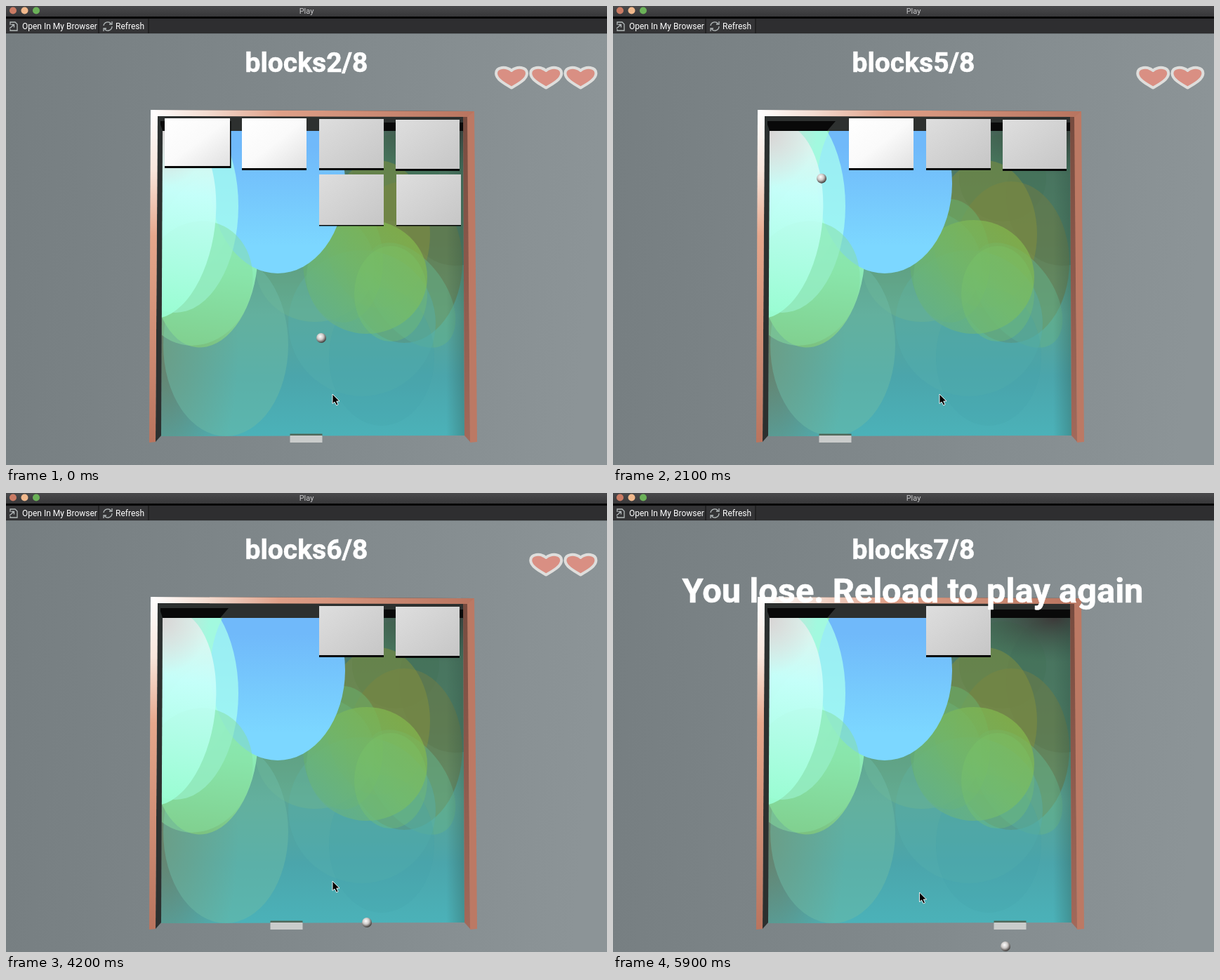
An HTML page that plays this animation: 856 by 654 pixels, repeating every 6000 ms.

```html
<!DOCTYPE html>
<html lang="en">
<head>
<meta charset="utf-8">
<title>Play</title>
<style>
html, body { margin: 0; width: 100%; height: 100%; overflow: hidden; background: #7e8689; }
svg { display: block; width: 856px; height: 654px; }
text { font-family: Roboto, sans-serif; fill: #fff; }
.big { font-weight: 700; text-anchor: middle; stroke: #fff; stroke-width: .6; }
.bar { font-size: 12px; }
</style>
</head>
<body>
<svg viewBox="0 0 856 654" xmlns="http://www.w3.org/2000/svg">
  <defs>
    <linearGradient id="room" x2="1" y2=".06"><stop stop-color="#767e81"/><stop offset=".5" stop-color="#80888b"/><stop offset="1" stop-color="#8c9497"/></linearGradient>
    <linearGradient id="title" x2="0" y2="1"><stop stop-color="#4a4a4c"/><stop offset="1" stop-color="#373739"/></linearGradient>
    <linearGradient id="floor" x2="0" y2="1"><stop stop-color="#4a7060"/><stop offset=".35" stop-color="#53876c"/><stop offset=".6" stop-color="#5aa597"/><stop offset=".8" stop-color="#4ba5ab"/><stop offset="1" stop-color="#4bb2b9"/></linearGradient>
    <linearGradient id="edge"><stop offset=".94" stop-color="#2a4a40" stop-opacity="0"/><stop offset="1" stop-color="#2a4a40" stop-opacity=".3"/></linearGradient>
    <linearGradient id="blue" x2="0" y2="1"><stop offset=".3" stop-color="#70b9fa"/><stop offset=".85" stop-color="#7cd7ff"/></linearGradient>
    <linearGradient id="mint" x2="0" y2="1"><stop offset=".2" stop-color="#98ffd8"/><stop offset=".55" stop-color="#90f0b8"/><stop offset="1" stop-color="#7dc37e"/></linearGradient>
    <linearGradient id="pale" x2="0" y2="1"><stop offset=".1" stop-color="#e2f6f2"/><stop offset=".35" stop-color="#c8fffb"/><stop offset="1" stop-color="#98ffd3"/></linearGradient>
    <linearGradient id="leaf" x1="1" x2="0" y2="1"><stop offset=".1" stop-color="#84b548"/><stop offset=".5" stop-color="#74b866"/><stop offset=".9" stop-color="#62b08c"/></linearGradient>
    <linearGradient id="wallL" x2="0" y2="1"><stop stop-color="#fff"/><stop offset=".18" stop-color="#f8e6dc"/><stop offset=".38" stop-color="#e6a78c"/><stop offset="1" stop-color="#b9745e"/></linearGradient>
    <linearGradient id="wallT"><stop stop-color="#fff"/><stop offset=".17" stop-color="#f4ddd2"/><stop offset=".4" stop-color="#dfa088"/><stop offset="1" stop-color="#b8745f"/></linearGradient>
    <linearGradient id="wallR" x2="0" y2="1"><stop stop-color="#764b3f"/><stop offset="1" stop-color="#a2695a"/></linearGradient>
    <linearGradient id="lit" x2="1" y2="1"><stop stop-color="#fff"/><stop offset=".5" stop-color="#fafafa"/><stop offset="1" stop-color="#e0e0e0"/></linearGradient>
    <linearGradient id="dim" x2="1" y2="1"><stop stop-color="#dedede"/><stop offset="1" stop-color="#c6c6c6"/></linearGradient>
    <radialGradient id="corner" cx="0" cy="0" r="1"><stop stop-color="#d8d4d4"/><stop offset="1" stop-color="#d8d4d4" stop-opacity="0"/></radialGradient>
    <radialGradient id="dusk" cx=".85" cy="0" r=".9"><stop stop-color="#3c3838"/><stop offset="1" stop-color="#3c5a4a" stop-opacity="0"/></radialGradient>
    <radialGradient id="brown" cx="0" cy=".5" r="1"><stop stop-color="#70785a" stop-opacity=".8"/><stop offset="1" stop-color="#70785a" stop-opacity="0"/></radialGradient>
    <radialGradient id="sphere" cx=".4" cy=".35" r=".65"><stop stop-color="#fff"/><stop offset=".5" stop-color="#ccc8c6"/><stop offset="1" stop-color="#403c3a"/></radialGradient>
    <clipPath id="field"><path d="M223 178H651L653 612L221 613Z"/></clipPath>
    <path id="heart" d="M0 29C-9 24-22 17-22 8.500C-22-1-8-2 0 4.500C8-2 22-1 22 8.500C22 17 9 24 0 29Z" fill="#d98f83" stroke="#dededc" stroke-width="4" stroke-linejoin="round"/>
  </defs>

  <rect y="39" width="856" height="615" fill="url(#room)"/>

  <rect width="856" height="15" fill="url(#title)"/>
  <rect y="15" width="856" height="24" fill="#070707"/>
  <rect y="18" width="856" height="21" fill="#2e2e30"/>
  <path d="M0 19H131V38H0ZM133 19H202V38H133Z" fill="#343436"/>
  <path d="M132 18V39M203 18V39" stroke="#161617"/>
  <path d="M0 39.500H856" stroke="#6f7679"/>
  <circle cx="10" cy="6.500" r="5" fill="#ca7b64"/>
  <circle cx="26.500" cy="6.500" r="5" fill="#f0b88c"/>
  <circle cx="43" cy="6.500" r="5" fill="#6bb158"/>
  <text x="428" y="11" font-size="11" text-anchor="middle" style="fill:#c6c6c8">Play</text>
  <g fill="none" stroke="#b4babb" stroke-width="1.300">
    <path d="M6 27V23H13L16 26V35H6V33M5 32L11 27M7.500 26.500H11.500V30.500"/>
    <path d="M139 28A6 6 0 0 1 149.500 25M151 29A6 6 0 0 1 140.500 33M151 22V26H147M139 36V32H143"/>
  </g>
  <text class="bar" x="23" y="33">Open In My Browser</text>
  <text class="bar" x="156" y="33">Refresh</text>

  <path d="M206 148L667 150L661 180H214Z" fill="#2d302f"/>
  <path d="M220 164H317L305 178H220ZM538 166H652V179H538Z" fill="#090909"/>
  <g clip-path="url(#field)">
    <rect x="220" y="178" width="434" height="436" fill="url(#floor)"/>
    <ellipse cx="555" cy="245" rx="62" ry="62" fill="#427457" opacity=".5"/>
    <ellipse cx="640" cy="270" rx="80" ry="100" fill="#44705a" opacity=".5"/>
    <rect x="500" y="178" width="154" height="70" fill="url(#dusk)"/>
    <ellipse cx="567" cy="365" rx="83" ry="115" fill="#6c7c48" opacity=".6"/>
    <ellipse cx="530" cy="325" rx="74" ry="105" fill="#84903c" opacity=".5"/>
    <ellipse cx="576" cy="412" rx="50" ry="85" transform="rotate(-36 576 412)" fill="#65b38a" opacity=".5"/>
    <ellipse cx="507" cy="452" rx="105" ry="104" fill="#55aeab" opacity=".42"/>
    <ellipse cx="535" cy="500" rx="75" ry="98" fill="#3f9eaa" opacity=".22"/>
    <ellipse cx="440" cy="370" rx="85" ry="80" fill="#6fb58d" opacity=".42"/>
    <ellipse cx="480" cy="363" rx="57" ry="88" fill="#68b46c" opacity=".5"/>
    <ellipse cx="514" cy="386" rx="86" ry="81" fill="url(#leaf)" opacity=".75"/>
    <ellipse cx="548" cy="410" rx="52" ry="68" fill="#7ac668" opacity=".3"/>
    <rect x="221" y="370" width="110" height="244" fill="url(#brown)"/>
    <ellipse cx="313" cy="483" rx="89" ry="130" fill="#6dbba6" opacity=".5"/>
    <ellipse cx="250" cy="260" rx="78" ry="125" fill="#8fe8ab"/>
    <ellipse cx="284" cy="365" rx="74" ry="122" transform="rotate(6 284 365)" fill="url(#mint)" opacity=".93"/>
    <ellipse cx="387" cy="252" rx="96" ry="129" fill="url(#blue)"/>
    <ellipse cx="241" cy="285" rx="90" ry="152" fill="#a9fff1" opacity=".75"/>
    <ellipse cx="272" cy="395" rx="78" ry="90" transform="rotate(20 272 395)" fill="#86e0a0" opacity=".5"/>
    <ellipse cx="223" cy="306" rx="75" ry="140" transform="rotate(7 223 306)" fill="url(#pale)" opacity=".9"/>
    <rect x="221" y="178" width="70" height="80" fill="url(#corner)"/>
    <rect x="221" y="178" width="432" height="436" fill="url(#edge)"/>
  </g>
  <path d="M216 156L223 178L221 612L213 621Z" fill="#2c302f"/>
  <path d="M651 158H658L661 621L653 612Z" fill="url(#wallR)"/>
  <path d="M206 148L667 150V158L206 157Z" fill="url(#wallT)"/>
  <path d="M206 148L216 156L213 621L204 622Z" fill="url(#wallL)"/>
  <path d="M657 158L667 150L671 621L661 622Z" fill="#bc7964"/>

  <g id="blocks"></g>
  <g id="paddle">
    <path d="M0 609.500H46V613H0Z" fill="#52685a"/>
    <path d="M0 612H46V622H0Z" fill="#cacccb"/>
  </g>
  <circle id="ball" r="7" fill="url(#sphere)"/>
  <g id="hearts"></g>
  <text id="score" class="big" x="428" y="93.500" font-size="39"></text>
  <text id="lose" class="big" x="427" y="156" font-size="48.800">You lose. Reload to play again</text>
  <path id="cursor" d="M0 0V13.500L3 11L5.700 16L8 15L5.800 10H10Z" fill="#000" stroke="#fff" stroke-width=".9"/>
</svg>
<script>
const LOOP = 6000, STEP = 100;
const $ = id => document.getElementById(id);

function add(parent, tag, attrs) {
  const el = document.createElementNS('http://www.w3.org/2000/svg', tag);
  for (const key in attrs) el.setAttribute(key, attrs[key]);
  return parent.appendChild(el);
}

// x, y, width, height, fill, time of the hit
const blocks = [
  [226, 160, 93, 68, 'lit', 2100],
  [336, 160, 92, 71, 'lit', 2600],
  [446, 161, 92, 70, 'dim', LOOP],
  [555, 162, 91, 70, 'dim', 5400],
  [446, 240, 92, 72, 'dim', 1800],
  [556, 240, 92, 72, 'dim', 1900]
].map(([x, y, w, h, fill, end]) => {
  const el = add($('blocks'), 'g', {});
  add(el, 'rect', { x, y: y + 4, width: w + (x < 300 ? 1.5 : 0), height: h - (y > 200 ? 2.5 : 1), fill: '#070807' });
  add(el, 'rect', { x, y, width: w, height: h, fill: `url(#${fill})` });
  return { el, end };
});

const hearts = [200, 4300, 5900].map((end, i) => ({
  el: add($('hearts'), 'use', { href: '#heart', x: 720 + i * 49.2, y: 87.5 }), end
}));

const flights = [
  [[0, 449, 473], [250, 476, 675]],
  [[1380, 427, 600], [1600, 436, 420], [1740, 442, 319], [1870, 548, 285],
   [2080, 312, 238], [2190, 230, 280], [2500, 413, 262], [2540, 405, 241],
   [2780, 230, 270], [3300, 590, 335], [3370, 645, 352], [3800, 230, 480],
   [4200, 514, 612], [4320, 546, 655]],
  [[4950, 427, 600], [5400, 600, 241], [5600, 645, 403], [5900, 559, 646], [6000, 530, 727]]
];
const paddle = [[0, 404.5], [900, 404.5], [1300, 293.5], [3900, 293.5], [4200, 376.5],
  [4299, 404.5], [5300, 404.5], [5900, 542.5], [LOOP, 542.5]];

// Linear interpolation through [time, ...values]; null outside the range.
function along(keys, t) {
  const i = keys.findIndex((k, n) => n && t <= k[0] && t >= keys[n - 1][0]);
  if (i < 1) return null;
  const a = keys[i - 1], b = keys[i], f = (t - a[0]) / (b[0] - a[0]);
  return a.slice(1).map((v, n) => v + (b[n + 1] - v) * f);
}

const show = (el, on) => el.setAttribute('visibility', on ? 'visible' : 'hidden');
const move = (el, x, y) => el.setAttribute('transform', `translate(${x} ${y})`);

function draw(t) {
  for (const { el, end } of [...blocks, ...hearts]) show(el, t < end);
  $('score').textContent = `blocks${2 + blocks.filter(b => t >= b.end).length}/8`;
  const pos = flights.map(f => along(f, t)).find(Boolean);
  show($('ball'), pos);
  if (pos) move($('ball'), ...pos);
  move($('paddle'), along(paddle, t)[0], 0);
  move($('cursor'), ...(t < 4600 ? [465, 553] : [436.5, 569]));
  show($('lose'), t >= 5900);
}

function tick() {
  draw(Math.floor(performance.now() % LOOP / STEP) * STEP);
  requestAnimationFrame(tick);
}
tick();
</script>
</body>
</html>
```
